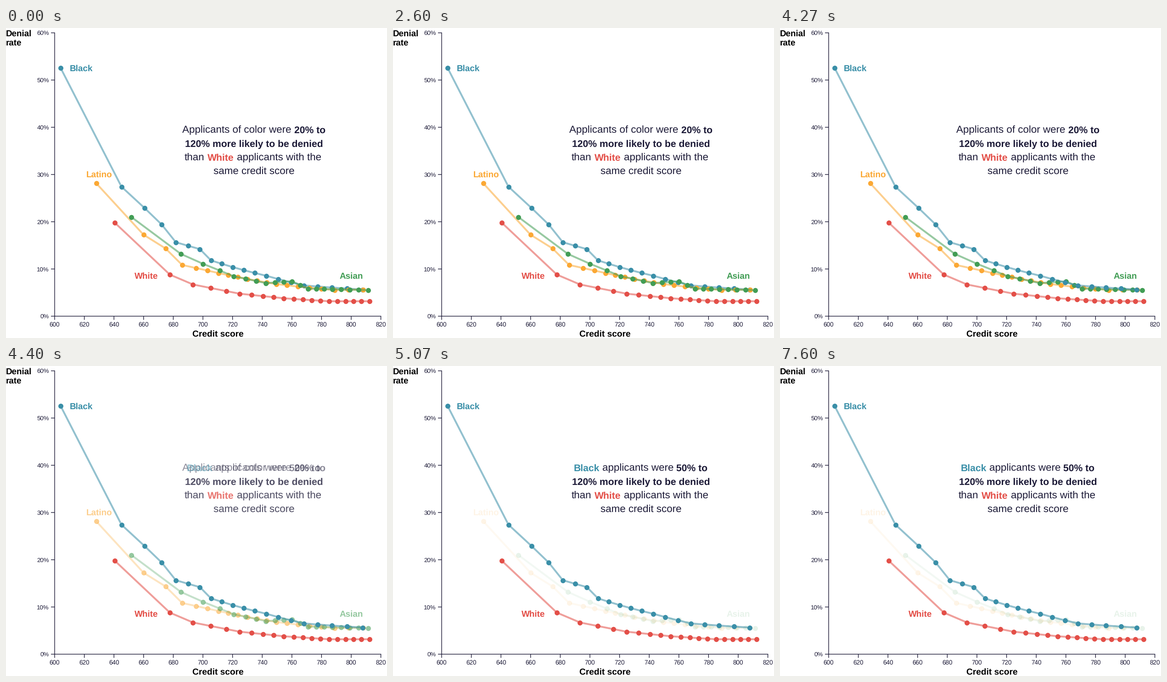
A matplotlib script that plays this animation: 830 by 675 pixels, repeating every 8 s.

```python
import numpy as np
import matplotlib.pyplot as plt
from matplotlib.animation import FuncAnimation
from matplotlib.collections import LineCollection

WIDTH, HEIGHT, DPI = 830, 675, 100
LOOP_MS, STEP_MS = 8000, 50
RAISE_MS, FADE_START, FADE_MS = 4250, 4275, 250
FADED = 0.12
PT = 72 / DPI  # points per pixel
DOT_COUNT = 20
SPREAD_AT = (0, 1, 4, 10, 19)  # dots whose x position is given

INK, BLUE, AMBER, GREEN, RED = "#1c1a37", "#3a8fa8", "#fba834", "#429d55", "#e34f48"

plt.rcParams.update({"font.family": "Liberation Sans", "text.hinting": "none"})

fig = plt.figure(figsize=(WIDTH / DPI, HEIGHT / DPI), dpi=DPI, facecolor="white")
ax = fig.add_axes([0, 0, 1, 1])
ax.set(xlim=(0.5, WIDTH + 0.5), ylim=(HEIGHT + 0.5, 0.5))
ax.axis("off")


def label(x, y, text, size, color=INK, bold=False, ha="left", z=1):
    return ax.text(x, y, text, fontsize=size * PT, color=color, ha=ha, va="baseline",
                   weight="bold" if bold else "normal", zorder=z)


def x_pix(score):
    return 106.5 + (score - 600) * 3.23


def y_pix(rate):
    return 628 - rate * 10.283


def rule(xs, ys):
    ax.plot(xs, ys, color=INK, lw=1.4 * PT, solid_capstyle="butt", zorder=1, snap=False)


def draw_axes():
    left, right, bottom, top = x_pix(600), x_pix(820), y_pix(0), y_pix(60)
    rule([left, left], [top - 0.7, bottom])
    rule([left, right + 0.7], [bottom, bottom])
    for rate in range(0, 61, 10):
        y = y_pix(rate)
        rule([left - 8, left], [y, y])
        label(94.5, y + 4.8, f"{rate}%", 13.3, ha="right")
    for score in range(600, 821, 20):
        x = x_pix(score)
        rule([x, x], [bottom, bottom + 8])
        label(x, 650, str(score), 13.5, ha="center")
    label(0.5, 18, "Denial", 18.8, "black", True)
    label(0.5, 38, "rate", 18.8, "black", True)
    label(462, 672.5, "Credit score", 19.1, "black", True, "center")


def place_dots(spread, bends):
    """Smooth x spacing through `spread`; heights run between the `bends` {dot: y}."""
    root = np.sqrt(np.arange(DOT_COUNT))
    curve = np.polyfit(np.sqrt(SPREAD_AT), spread, len(SPREAD_AT) - 1)
    ys = np.interp(root, np.sqrt(list(bends)), list(bends.values()))
    return np.column_stack([np.polyval(curve, root), ys])


class Series:
    """Dots joined by translucent lines, with a name label."""

    def __init__(self, name, name_xy, color, z, spread, bends):
        points = place_dots(spread, bends)
        start, end = points[:-1], points[1:]
        span = end - start
        # Lines stop at the dot edges so that fading dots stay flat.
        trim = 4.5 * span / np.hypot(*span.T)[:, None]
        self.lines = LineCollection(np.stack([start + trim, end - trim], axis=1),
                                    colors=color, linewidths=4 * PT, capstyle="butt")
        ax.add_collection(self.lines)
        self.dots, = ax.plot(*points.T, "o", color=color, ms=11 * PT, mew=0, snap=False)
        self.name = label(*name_xy, name, 18.9, color, True, "center")
        self.set_order(z)
        self.set_opacity(1)

    def set_order(self, z):
        self.lines.set_zorder(z)
        self.dots.set_zorder(z + 0.1)
        self.name.set_zorder(z + 0.2)

    def set_opacity(self, value):
        self.lines.set_alpha(0.55 * value)
        self.dots.set_alpha(value)
        self.name.set_alpha(value)


def caption(first_line):
    """Paragraph made of (x, baseline, text, color, bold) runs."""
    runs = first_line + [
        (390, 259, "120% more likely to be denied", INK, True),
        (389.5, 289, "than", INK, False),
        (439, 289, "White", RED, True),
        (503.5, 289, "applicants with the", INK, False),
        (452.5, 318.8, "same credit score", INK, False),
    ]
    return [label(x, y, text, 21.1 if bold else 22.4, color, bold, z=9)
            for x, y, text, color, bold in runs]


draw_axes()

black = Series("Black", (164, 94), BLUE, 2, (119.5, 252, 370.5, 518, 777.5),
               {0: 87.5, 1: 346, 3: 428.5, 4: 467, 6: 482, 7: 506.5, 12: 540, 15: 561, 19: 570})
latino = Series("Latino", (204, 325.3), AMBER, 3, (197, 300, 414, 547, 778),
                {0: 338.5, 1: 450.5, 2: 480.5, 3: 516.5, 6: 534, 12: 558, 17: 571, 19: 570})
asian = Series("Asian", (752.5, 546), GREEN, 4, (273.5, 381.5, 496.5, 623.5, 789),
               {0: 412, 1: 492.5, 2: 514, 4: 541, 7: 556, 10: 552, 12: 568, 19: 571})
white = Series("White", (306, 546), RED, 5, (237.5, 357.5, 480, 627, 792),
               {0: 424.5, 1: 537.5, 2: 559, 5: 579, 9: 589, 14: 595.5, 19: 595.5})

everyone_text = caption([
    (384, 229, "Applicants of color were", INK, False),
    (628, 229, "20% to", INK, True),
])
black_text = caption([
    (394, 229, "Black", BLUE, True),
    (456, 229, "applicants were", INK, False),
    (617, 229, "50% to", INK, True),
])


def ease_cubic(u):
    u = min(max(u, 0), 1)
    return 4 * u ** 3 if u < 0.5 else 1 - 4 * (1 - u) ** 3


def update(frame):
    now = frame * STEP_MS
    fade = ease_cubic((now - FADE_START) / FADE_MS)
    black.set_order(6 if now >= RAISE_MS else 2)
    for series in (latino, asian):
        series.set_opacity(1 - (1 - FADED) * fade)
    for texts, alpha in ((everyone_text, 1 - fade), (black_text, fade)):
        for text in texts:
            text.set_alpha(alpha)
            text.set_visible(alpha > 0)
    return []


anim = FuncAnimation(fig, update, frames=LOOP_MS // STEP_MS, interval=STEP_MS,
                     init_func=lambda: update(0), repeat=True, repeat_delay=0, blit=False)
plt.show()
```
